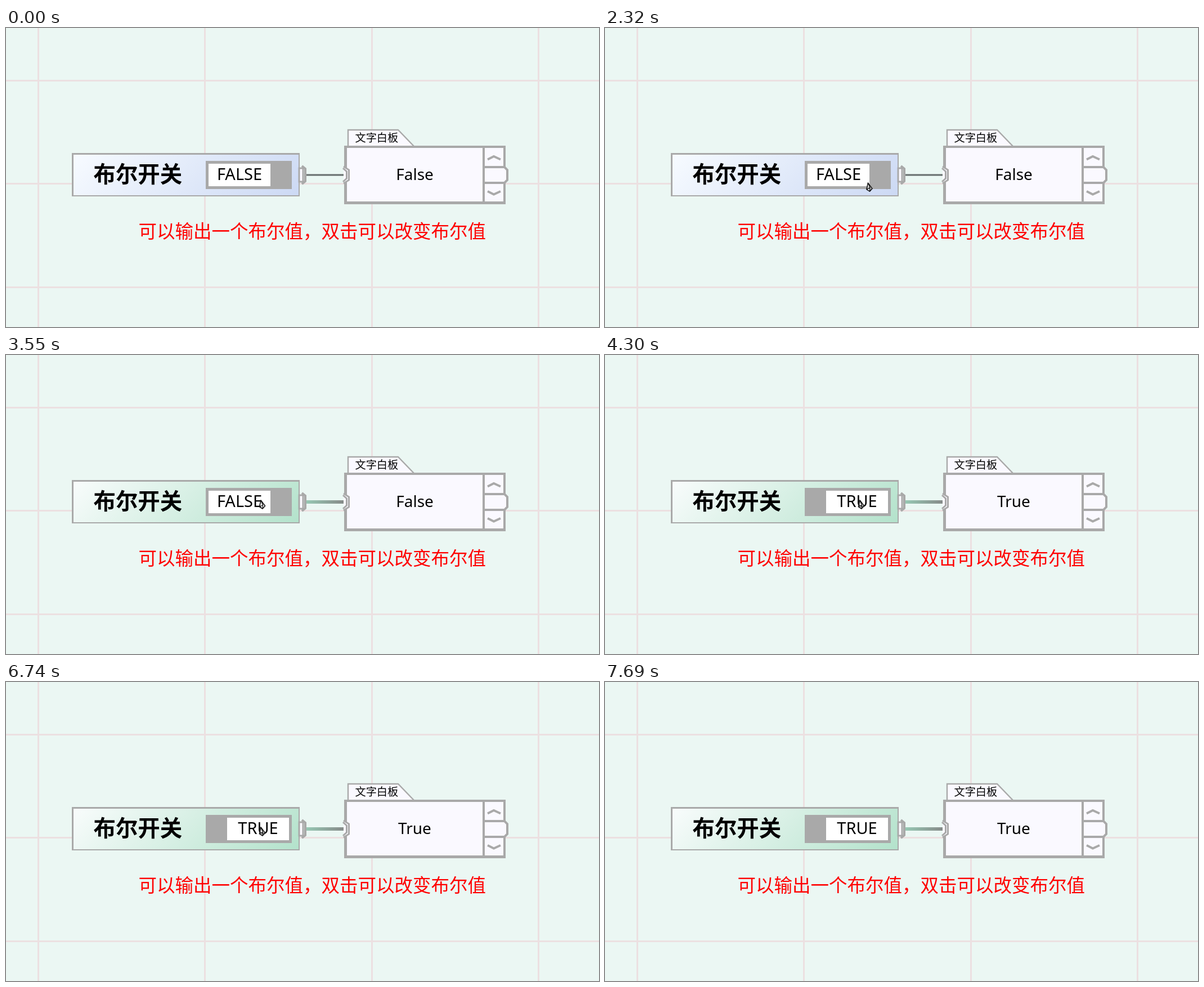
An HTML page with a canvas that plays this animation: 1054x531 px, repeating every 8.15 s.

```html
<!DOCTYPE html>
<html lang="zh-CN">
<head>
<meta charset="utf-8">
<title>布尔开关</title>
<style>
html, body { margin: 0; width: 100%; height: 100%; overflow: hidden; background: #ebf7f3; }
canvas { display: block; }
</style>
</head>
<body>
<canvas id="stage" width="1054" height="531"></canvas>
<script>
const ctx = document.getElementById('stage').getContext('2d');
const LOOP = 8150;
const GREY = '#a9a9a9', PAPER = '#faf9ff';
const CJK = '"Noto Sans CJK SC", "Noto Sans CJK", sans-serif';
const LATIN = '"Noto Sans", "Open Sans", sans-serif';

const clamp = v => Math.min(1, Math.max(0, v));
const ramp = (t, a, b) => clamp((t - a) / (b - a));
const mix = (a, b, p) => a + (b - a) * p;
const smooth = p => p * p * (3 - 2 * p);

function rect(x0, y0, x1, y1, fill) {
  ctx.fillStyle = fill;
  ctx.fillRect(x0, y0, x1 - x0, y1 - y0);
}

function path(points, { stroke, width = 1, fill, close = false }) {
  ctx.beginPath();
  points.forEach(([x, y]) => ctx.lineTo(x, y));
  if (close) ctx.closePath();
  if (fill) { ctx.fillStyle = fill; ctx.fill(); }
  if (stroke) { ctx.strokeStyle = stroke; ctx.lineWidth = width; ctx.stroke(); }
}

function text(str, x, y, font, color = '#000', align = 'left') {
  ctx.font = font;
  ctx.fillStyle = color;
  ctx.textAlign = align;
  ctx.fillText(str, x, y);
}

function gradient(x0, y0, x1, y1, ...colors) {
  const g = ctx.createLinearGradient(x0, y0, x1, y1);
  colors.forEach((c, i) => g.addColorStop(i / (colors.length - 1), c));
  return g;
}

function drawGrid() {
  rect(0, 0, 1054, 531, '#ebf7f3');
  for (let i = 0; i < 4; i++) {
    const x = 56 + Math.round(i * 296.4);
    rect(x, 0, x + 3, 531, '#ece0e1');
  }
  for (let i = 0; i < 3; i++) {
    const y = 91.5 + i * 183.6;
    rect(0, Math.round(y), 1054, Math.round(y) + 3, '#ece0e1');
  }
}

function drawLink(glow) {
  rect(533, 259.5, 606, 262.5, '#666d6d');
  ctx.globalAlpha = glow;
  rect(533, 258, 606, 264, gradient(533, 0, 606, 0, '#97c9b4', '#858585'));
  ctx.globalAlpha = 1;
}

function drawSwitch(slide, on, glow) {
  rect(117, 222, 522, 299, GREY);
  rect(120, 225, 520, 297, gradient(200, 141, 439, 380, '#f7fbff', '#ccd9f4'));
  ctx.globalAlpha = glow;
  rect(120, 225, 520, 297, gradient(200, 141, 439, 380, '#f9fcfc', '#b3e2cb'));
  ctx.globalAlpha = 1;
  text('布尔开关', 155.5, 274, 'bold 39.4px ' + CJK);

  rect(355, 236, 508, 286, GREY);
  const x = mix(360, 393, slide);
  rect(x, 241, x + 110, 281, '#fff');
  text(on ? 'TRUE' : 'FALSE', x + 55, 270, '29px ' + LATIN, '#000', 'center');

  path([[521, 249], [528, 249], [528, 273], [521, 273]],
    { stroke: GREY, width: 3, fill: PAPER, close: true });
  path([[526, 245], [532, 250], [532, 272], [526, 277]], { stroke: GREY, width: 4 });
}

function drawBoard(on) {
  path([[608, 212], [608, 181], [697, 181], [727, 212]],
    { stroke: GREY, width: 2.4, fill: PAPER });
  text('文字白板', 620.5, 202, '19.2px ' + CJK);

  rect(601, 209, 888, 313, GREY);
  rect(606, 213, 884, 308, PAPER);
  rect(847, 213, 851, 308, GREY);
  path([[849, 247], [886, 247], [891, 252], [891, 270], [886, 275], [849, 275]],
    { stroke: GREY, width: 4, fill: PAPER, close: true });
  path([[856, 233.5], [867, 228], [879, 233.5]], { stroke: GREY, width: 4 });
  path([[856, 290], [867, 295.5], [879, 290]], { stroke: GREY, width: 4 });

  path([[600, 246], [609.5, 252], [609.5, 270], [600, 276]],
    { stroke: GREY, width: 3, fill: PAPER });
  path([[599, 249], [605.5, 255], [605.5, 267], [599, 273]], { stroke: GREY, width: 3 });

  text(on ? 'True' : 'False', 726.5, 270, '28px ' + LATIN, '#000', 'center');
}

// Time, tip x, tip y, and the easing into that point.
const KEYS = [
  [1810, 928.5, 529.5],
  [2600, 441, 260, p => 1 - (1 - p) ** 2.8],
  [2700, 441, 260],
  [2770, 438, 260, smooth],
  [2880, 461, 259, smooth],
  [2990, 453, 257.5, smooth],
  [6750, 453, 257.5],
  [7350, 771, 406, p => p ** 1.35],
  [7690, 1015, 540, p => p]
];

function cursorAt(t) {
  const i = KEYS.findIndex(k => t < k[0]);
  if (i <= 0) return KEYS[0].slice(1, 3);
  const a = KEYS[i - 1], b = KEYS[i];
  const p = (b[3] || (v => v))(ramp(t, a[0], b[0]));
  return [mix(a[1], b[1], p), mix(a[2], b[2], p)];
}

function drawCursor(t) {
  if (t < 1460 || t >= 7690) return;
  ctx.save();
  ctx.translate(...cursorAt(t));
  ctx.lineJoin = 'round';
  path([[0, 0.5], [-2.5, 12], [3, 15.5], [7.5, 10.5]],
    { stroke: '#111', width: 1.6, fill: 'rgba(255,255,255,.45)', close: true });
  path([[0, 0.5], [3.5, 9], [-2.5, 12]], { stroke: '#111', width: 1.3 });
  path([[3.5, 9], [3, 15.5]], { stroke: '#111', width: 1.3 });
  ctx.restore();
}

function draw(t) {
  const flip = start => smooth(ramp(t, start - 20, start + 180));
  const slide = flip(3970) - flip(5640) + flip(6540);
  const on = (t >= 3970 && t < 5640) || t >= 6540;
  const glow = ramp(t, 3390, 3550);
  drawGrid();
  drawLink(glow);
  drawSwitch(slide, on, glow);
  drawBoard(on);
  text('可以输出一个布尔值，双击可以改变布尔值', 235.5, 372.5, '32.5px ' + CJK, '#f00');
  drawCursor(t);
}

const start = performance.now();
function tick() {
  draw((performance.now() - start) % LOOP);
  requestAnimationFrame(tick);
}
tick();
</script>
</body>
</html>
```
